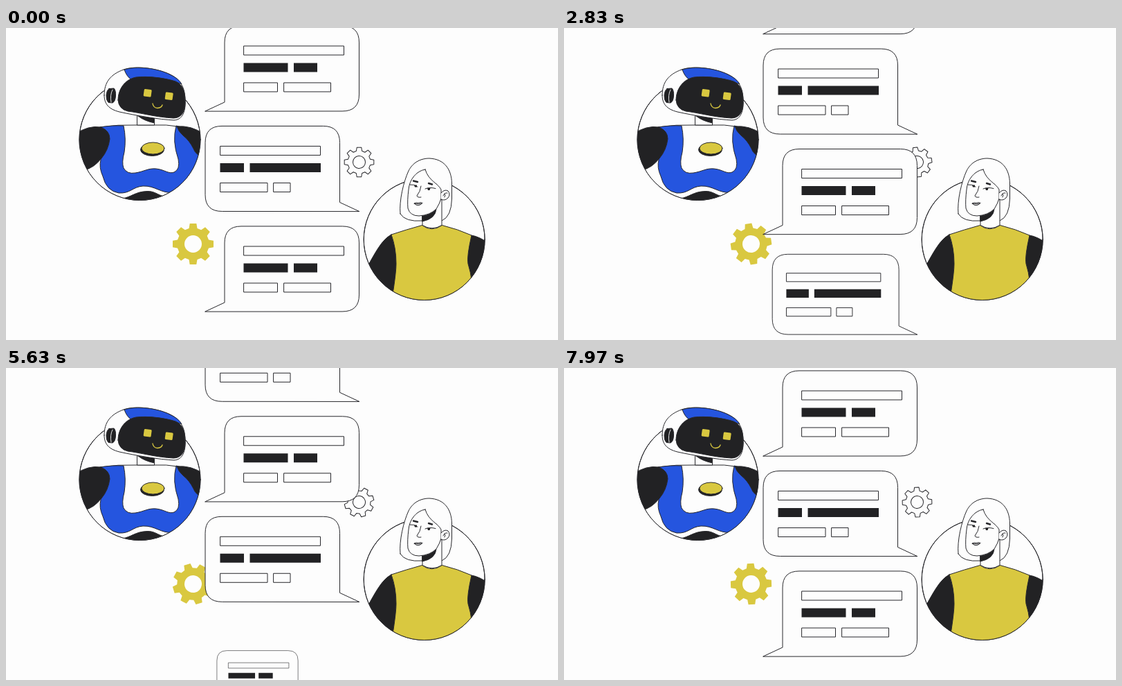
An HTML page that plays this animation: 798x450 px, repeating every 8.01 s.

```html
<!DOCTYPE html>
<html lang="en">
<head>
<meta charset="utf-8">
<title>Chat with a robot</title>
<style>
  html, body { margin: 0; width: 100%; height: 100%; overflow: hidden; background: #fdfdfd; }
  svg { display: block; width: 798px; height: 450px; }
  .w { fill: #fdfdfd; }
  .k { fill: #222224; }
  .y { fill: #d9c840; }
  .b { fill: #2555df; }
  .n { fill: none; }
  svg { stroke: #28282c; stroke-width: 1; stroke-linejoin: round; stroke-linecap: round; }
  .o { stroke: none; }
</style>
</head>
<body>
<svg viewBox="0 0 798 450">
  <defs>
    <clipPath id="leftDisc"><circle cx="193.5" cy="161" r="87.5"/></clipPath>
    <clipPath id="rightDisc"><circle cx="604.7" cy="305" r="87.5"/></clipPath>
    <path id="shape" class="w" d="M0 0L28-13V-99Q28-123 52-123H198.500Q222.500-123 222.500-99V-24Q222.500 0 198.500 0Z"/>
    <!-- Both bubbles have their origin at the tip of the tail -->
    <g id="tailLeft">
      <use href="#shape"/>
      <path class="n" d="M56-94H200.500V-81H56ZM56-41H104.500V-28H56ZM114-41H181.500V-28H114Z"/>
      <path class="k o" d="M55.500-69.500H119.500V-56.500H55.500ZM128-69.500H162V-56.500H128Z"/>
    </g>
    <g id="tailRight">
      <use href="#shape" transform="scale(-1 1)"/>
      <path class="n" d="M-200.500-94H-56V-81H-200.500ZM-200.500-41H-132.500V-28H-200.500ZM-123.500-41H-99.500V-28H-123.500Z"/>
      <path class="k o" d="M-201-69.500H-166.500V-56.500H-201ZM-158-69.500H-55.500V-56.500H-158Z"/>
    </g>
  </defs>

  <!-- Robot -->
  <circle class="w" cx="193.500" cy="161" r="87.500"/>
  <g clip-path="url(#leftDisc)">
    <path class="w" d="M120 145Q150 139 189 140H214Q240 139 272 148L290 250H110Z" stroke="none"/>
    <path class="n" d="M136 143Q162 139 189 140H214Q232 139 248 142"/>
    <path class="b" d="M136 143Q154 140 170 141Q174 160 171 179Q167 194 170 202Q175 211 187 209C200 207 205 202 217 203C229 204 235 211 243 208Q252 204 249 189Q240 163 246 141L262 145L290 175V215L240 237C225 239 215 227 198 228C183 229 180 239 163 238Q145 235 140 214Q134 201 137 190Z"/>
    <path class="k" d="M100 153Q119 140 137 143Q150 148 150 160Q148 176 138 188Q127 202 113 205L100 200Z"/>
    <path class="k" d="M247 142Q268 140 286 153V187Q274 183 271 174Q265 162 256 155Q249 149 247 142Z"/>
    <path class="k" d="M168 246C181 244 187 236 204 235.500C215 235 219 241 229 243L220 252H170Z"/>
  </g>
  <circle class="n" cx="193.500" cy="161" r="87.500"/>
  <ellipse class="k" cx="211.500" cy="175.500" rx="17" ry="9"/>
  <ellipse class="y" cx="212.500" cy="173.500" rx="16.500" ry="8.500"/>
  <path class="w" d="M189.500 122V140H214.500V128Z"/>
  <path class="k" d="M191 127L214.500 130V137Q200 134 191 127Z"/>
  <path class="w" d="M142 97C142 78 151 67 170 60C187 54 218 58 237 67C252 74 258 85 259 101C260 115 258 132 243 133C221 132 187 126 164 121C148 117 142 109 142 97Z"/>
  <path class="b" d="M171 60C189 54 219 58 237 67Q250 73 254 81Q235 73 211 71Q193 69 183 76Q174 70 171 60Z"/>
  <path class="k" d="M162 104C162 88 172 74 188 71C204 69 230 72 245 77C257 82 259 94 259 107C259 120 254 130 242 130C219 129 193 122 176 120Q163 117 162 104Z"/>
  <g class="y o">
    <rect x="199.200" y="88.500" width="11" height="10.500" rx="1.500" transform="rotate(8 204.700 93.700)"/>
    <rect x="230.200" y="93" width="11" height="10.500" rx="1.500" transform="rotate(8 235.700 98.200)"/>
  </g>
  <path class="n" d="M212 109Q213 115 219 115.500Q225 115 226 111" stroke="#d9c840" stroke-width="1.300"/>
  <path class="k" d="M149 87.500L156 87Q159 90 158.500 98Q158 106 154 108L148 107.500Q144.500 104 145 97Q145.500 90 149 87.500Z"/>
  <path class="n" d="M154 89Q150 97 152 107" stroke="#fdfdfd" stroke-width=".9"/>

  <!-- Woman -->
  <circle class="w" cx="604.700" cy="305" r="87.500"/>
  <g clip-path="url(#rightDisc)">
    <path class="k" d="M557 298C543 305 533 326 523 343L530 390H570L566 330ZM673 299Q685 301 700 312V370L674 368L664 330Z"/>
    <path class="y" d="M557 298Q578 291 601.500 284.500Q615 295 630.500 284.500Q653 290 673 299Q666 330 668 340Q672 353 673 364V400H559V384Q564 352 564 340Q564 317 557 298Z"/>
  </g>
  <circle class="n" cx="604.700" cy="305" r="87.500"/>
  <path class="w" d="M570 268C568 249 575 221 582 206C589 192 602 188 612 188C634 189 644 204 644.500 224V246Q644 272 630 278L602 278Q577 280 570 268Z"/>
  <path class="w" d="M602 268V284.500Q616 293 630 284.500V247Z"/>
  <path class="k" d="M602 271Q614 270 622 261Q621 275 602 279Z"/>
  <path class="w" d="M606 204C593 206 583 219 582 233Q580 249 581 260Q584 271 597 271Q613 270 622 261Q627 253 629 246V233C624 223 611 221 606 204Z"/>
  <path class="w" d="M629 238Q634 232 639 235Q643 240 639 245Q634 250 629 247"/>
  <path class="n" d="M632 242Q634 237 638 238M634 239Q636 241 634 244"/>
  <path class="n" d="M589 220.500L595 222M611 224L616 225.500" stroke-width="2.400"/>
  <path class="n" d="M584 226Q590 225 595 229M606 232Q612 229 621 231.500"/>
  <path class="k o" d="M590 226.500H594V229.500H591ZM609 231H613.500L612.500 234H610Z"/>
  <path class="n" d="M600 228Q599 236 594 242Q595 245 600 244"/>
  <path class="n" d="M590 253Q594 251 596 252.500Q599 251 602 252.500Q597 255 590 253Q596 259 602 252.500"/>

  <path id="bigGear" class="y o" fill-rule="evenodd"/>
  <path id="smallGear" class="w" fill-rule="evenodd"/>
  <g id="chat"></g>
</svg>
<script>
const LOOP = 8010, STEP = LOOP / 8, START = 215, GAP = 144.5;
const $ = id => document.getElementById(id);

function gearPath(outer, root, hole, tip, base) {
  const points = [];
  for (let i = 0; i < 8; i++) {
    const a = i * Math.PI / 4, c = Math.cos(a), s = Math.sin(a);
    for (const [x, y] of [[-base, -root], [-tip, -outer], [tip, -outer], [base, -root]])
      points.push((x * c - y * s).toFixed(2) + ' ' + (x * s + y * c).toFixed(2));
  }
  return `M${points.join('L')}ZM${hole} 0A${hole} ${hole} 0 1 0 ${-hole} 0A${hole} ${hole} 0 1 0 ${hole} 0Z`;
}
$('bigGear').setAttribute('d', gearPath(29.5, 22.5, 12.5, 4.8, 6));
$('smallGear').setAttribute('d', gearPath(21.3, 16, 9, 3.2, 4.2));

const bubbles = [0, 1, 2, 3].map(() =>
  $('chat').appendChild(document.createElementNS('http://www.w3.org/2000/svg', 'use')));

// Speeds up, runs evenly, slows down
function glide(f, ramp = 0.26) {
  const v = 1 / (1 - ramp);
  if (f < ramp) return v * f * f / (2 * ramp);
  if (f > 1 - ramp) return 1 - v * (1 - f) ** 2 / (2 * ramp);
  return v * (f - ramp / 2);
}
const smooth = u => u * u * (3 - 2 * u);

function draw(now) {
  const t = now % LOOP, angle = 360 * t / LOOP;
  $('bigGear').setAttribute('transform', `translate(270.5 311.5) rotate(${angle})`);
  $('smallGear').setAttribute('transform', `translate(510.5 193.5) rotate(${angle})`);

  const turn = (t - START) / STEP, n = Math.floor(turn), f = turn - n;
  bubbles.forEach((el, age) => {
    const left = (n - age) & 1;
    const y = 536.3 - GAP * (age + glide(f));
    const size = age ? 1 : smooth(Math.min(1, f * STEP / 720));
    el.setAttribute('href', left ? '#tailLeft' : '#tailRight');
    el.setAttribute('transform', `translate(${left ? 288 : 510.5} ${y}) scale(${size})`);
  });
}

const begin = performance.now();
function tick() {
  draw(performance.now() - begin);
  requestAnimationFrame(tick);
}
tick();
</script>
</body>
</html>
```
